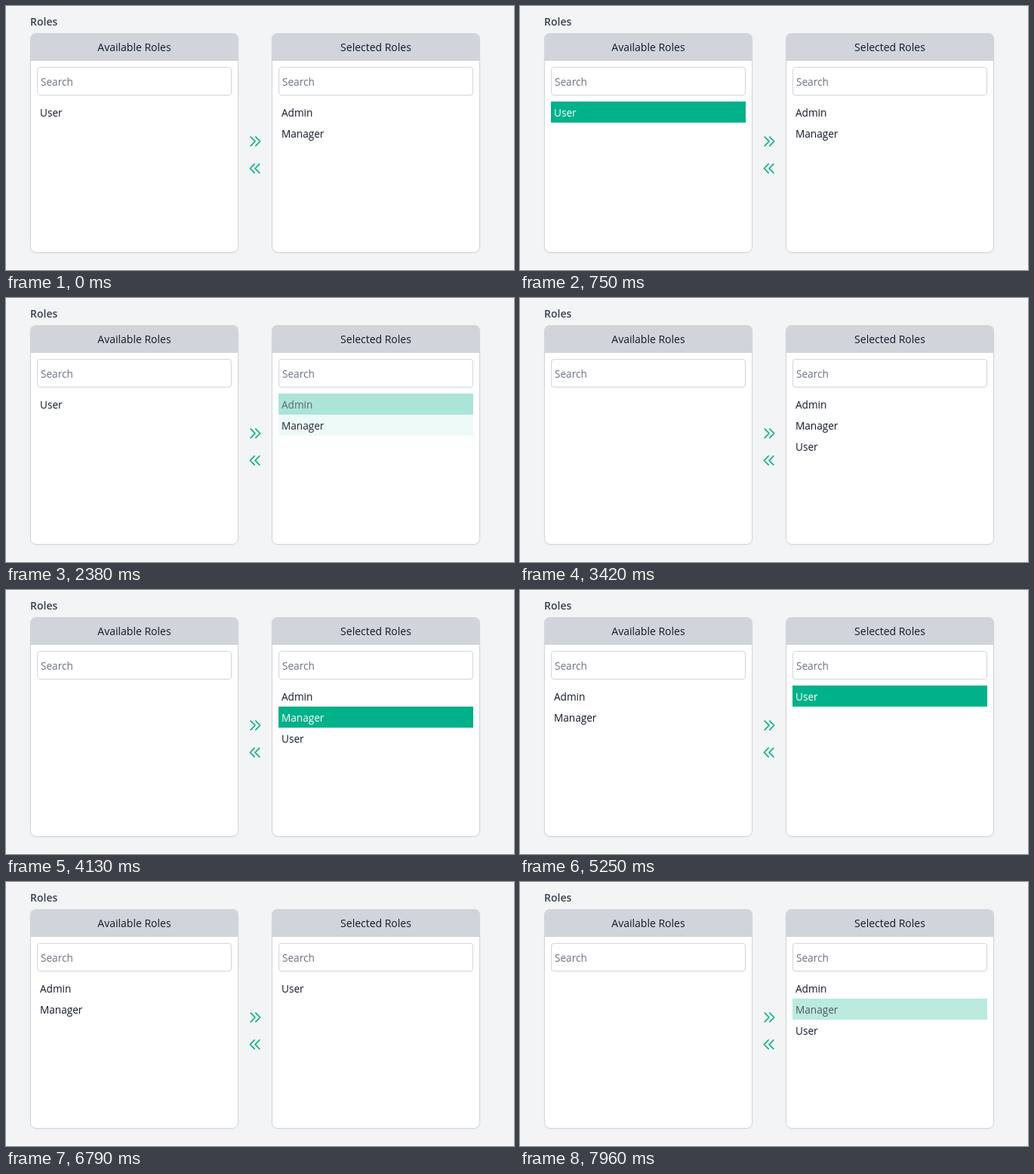
Recreate the animation shown at these times as an HTML page. Size 673 by 351 pixels, loop 8000 ms.

```html
<!DOCTYPE html>
<html lang="en">
<head>
<meta charset="utf-8">
<title>Role picker</title>
<style>
  html, body { margin: 0; width: 100%; height: 100%; overflow: hidden; background: #f3f4f6; }
  svg { display: block; }
  text { font: 13.6px "Open Sans", "Noto Sans", sans-serif; fill: #111827; }
  .title { font-size: 14px; font-weight: 600; fill: #374151; }
  .head { font-size: 14px; text-anchor: middle; }
  .hint { fill: #6b7280; }
  .panel { filter: drop-shadow(0 1px 1px rgba(0, 0, 0, .05)); }
  .box { fill: #fff; stroke: #d1d5db; }
  .bar { fill: #d1d5db; }
  .hot { fill: #00b189; }
  .btn path { fill: none; stroke: #00b189; stroke-width: 2; stroke-linecap: round; stroke-linejoin: round; }
  .btn rect { fill: none; }
  .btn.on rect { fill: #00b189; }
  .btn.on path { stroke: #fff; }
</style>
</head>
<body>
<svg id="stage" width="673" height="351" viewBox="0 0 673 351">
  <defs>
    <g id="frame">
      <rect class="box panel" x=".5" y=".5" width="275" height="291" rx="7.5"/>
      <path class="bar" d="M0 37V8a8 8 0 0 1 8-8H268a8 8 0 0 1 8 8V37Z"/>
      <rect class="box" x="9.5" y="45.5" width="257" height="37" rx="3.5"/>
      <text class="hint" x="14" y="70">Search</text>
    </g>
  </defs>
  <text class="title" x="32" y="26">Roles</text>
  <use href="#frame" x="32" y="36"/>
  <use href="#frame" x="352" y="36"/>
  <text class="head" x="170" y="60">Available Roles</text>
  <text class="head" x="490" y="60">Selected Roles</text>
  <g class="btn" id="add" transform="translate(316 166)">
    <rect width="28" height="28" rx="4"/>
    <path transform="translate(4 4) scale(.8333)" d="M13 5l7 7-7 7M5 5l7 7-7 7"/>
  </g>
  <g class="btn" id="remove" transform="translate(316 202)">
    <rect width="28" height="28" rx="4"/>
    <path transform="translate(4 4) scale(.8333)" d="M11 19l-7-7 7-7m8 14l-7-7 7-7"/>
  </g>
</svg>
<script>
const LOOP = 8000, STEP = 1000 / 24, FADE = 150;
const stage = document.getElementById('stage');

// List contents after each click: [time, left, right]
const lists = [
  [0, ['User'], ['Admin', 'Manager']],
  [3415, [], ['Admin', 'Manager', 'User']],
  [4455, ['Manager'], ['Admin', 'User']],
  [5245, ['Admin', 'Manager'], ['User']],
  [7495, [], ['Admin', 'Manager', 'User']]
];

// Pointer enter and leave times per row
const hovers = [
  [
    [[605, 1400], [2393, 3415], [5990, 6154]],
    [[6154, 6484]]
  ],
  [
    [[1519, 1815], [2332, 2380], [4773, 5865]],
    [[1815, 2272], [3980, 4773], [7919, LOOP]],
    []
  ]
];

const buttons = {
  add: [[6660, 6785], [7120, 7785]],
  remove: [[6825, 7120]]
};

function make(tag, attrs) {
  const el = document.createElementNS('http://www.w3.org/2000/svg', tag);
  for (const key in attrs) el.setAttribute(key, attrs[key]);
  return stage.appendChild(el);
}

const rows = hovers.flatMap((side, col) => side.map((spans, i) => {
  const x = 41 + col * 320, y = 127 + i * 28;
  return {
    col, i, spans,
    rect: make('rect', { class: 'hot', x, y, width: 258, height: 28 }),
    text: make('text', { x: x + 4, y: y + 20 })
  };
}));

// cubic-bezier(.4, 0, .2, 1), solved by bisection
function ease(x) {
  if (x <= 0) return 0;
  if (x >= 1) return 1;
  let lo = 0, hi = 1, s = .5;
  for (let k = 0; k < 20; k++) {
    s = (lo + hi) / 2;
    const r = 1 - s;
    if (1.2 * r * r * s + .6 * r * s * s + s * s * s < x) lo = s; else hi = s;
  }
  return s * s * (3 - 2 * s);
}

function level(spans, t) {
  return Math.max(0, ...spans.map(([on, off]) => {
    const peak = ease((Math.min(t, off) - on) / FADE);
    return t <= off ? peak : peak * (1 - ease((t - off) / (FADE * peak)));
  }));
}

const mix = a => 'rgb(' + [17, 24, 39].map(c => Math.round(c + (255 - c) * a)) + ')';

function draw(time) {
  const t = Math.floor((time % LOOP + 4) / STEP) * STEP;
  const state = lists.filter(l => l[0] <= t).pop();
  for (const row of rows) {
    const label = state[row.col + 1][row.i] || '';
    const a = label ? level(row.spans, t) : 0;
    if (row.text.textContent !== label) row.text.textContent = label;
    row.rect.style.opacity = a;
    row.text.style.fill = mix(a);
  }
  for (const id in buttons) {
    const on = buttons[id].some(([from, to]) => t >= from && t < to);
    document.getElementById(id).classList.toggle('on', on);
  }
}

const start = performance.now();
function tick() {
  draw(performance.now() - start);
  requestAnimationFrame(tick);
}
tick();
</script>
</body>
</html>
```
